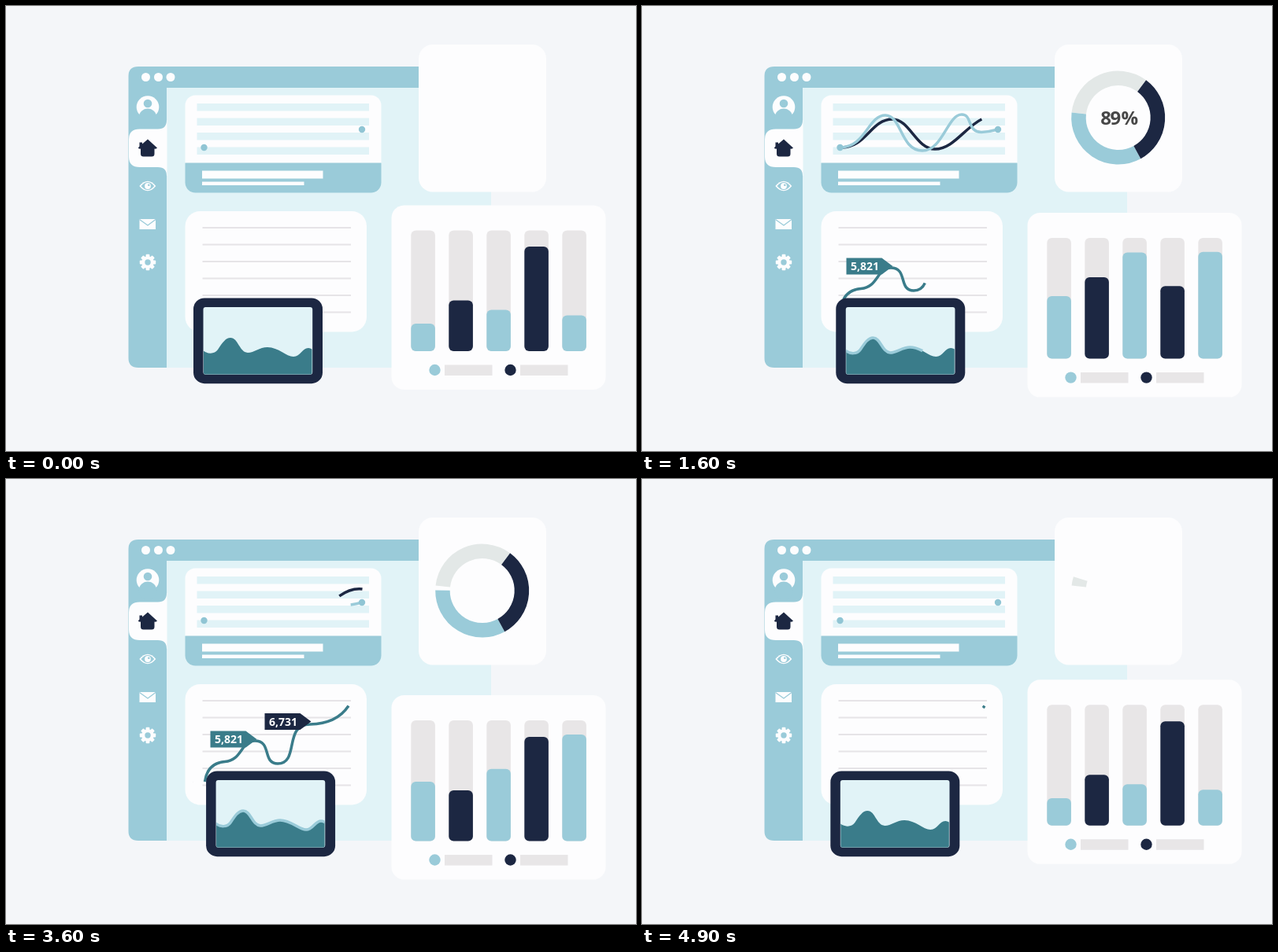
Write an HTML page that moves like this. It is 800 by 566 pixels and loops after 5000 ms.

```html
<!DOCTYPE html>
<html lang="en">
<head>
<meta charset="utf-8">
<title>Dashboard</title>
<style>
  html, body { margin: 0; width: 100%; height: 100%; overflow: hidden; background: #f4f6f9; }
  svg { display: block; width: 100%; height: 100%; }
  text { font-family: "Noto Sans", "Open Sans", sans-serif; font-weight: 700; }
  .blue { fill: #9acbd9; }
  .pale { fill: #e1f3f7; }
  .white { fill: #fdfdfe; }
  .navy { fill: #1c2742; }
  .teal { fill: #3a7c8a; }
  .grey { fill: #e8e6e7; }
  .line { fill: none; stroke-width: 3.5; }
  .tag text { font-size: 14px; fill: #fff; }
  .count { font-size: 24px; font-stretch: 87.5%; fill: #474747; }
  .count .mid { text-anchor: middle; }
</style>
</head>
<body>
<svg viewBox="0 0 800 566">
  <defs>
    <clipPath id="screen"><rect x="251" y="383" width="137.5" height="85.5" rx="2"/></clipPath>
    <clipPath id="roll"><rect x="575" y="125" width="34" height="30.5"/></clipPath>
    <clipPath id="panel"><rect x="227.5" y="113.5" width="249" height="124" rx="13"/></clipPath>
  </defs>

  <!-- window -->
  <path class="pale" d="M200 100H616V460H200Z"/>
  <path class="blue" d="M168 77H616V104H204V460H168Q155.500 460 155.500 448V89Q155.500 77 168 77Z"/>
  <g class="white">
    <circle cx="177.500" cy="90.500" r="5.500"/>
    <circle cx="193.500" cy="90.500" r="5.500"/>
    <circle cx="209" cy="90.500" r="5.500"/>
    <path d="M204.500 145V216H204Q204 205 193 205H170Q156 205 156 192V169.500Q156 156.500 170 156.500H193Q204 156.500 204 145Z"/>
    <circle cx="180" cy="128.500" r="14.300"/>
  </g>
  <g class="blue">
    <circle cx="180" cy="124" r="5.300"/>
    <ellipse cx="180" cy="142" rx="11.300" ry="11.500"/>
  </g>
  <path class="navy" d="M180 169.500L192 180.500Q191 182 188.500 181.500V188Q188.500 191.500 185 191.500H174.500Q171 191.500 171 188V181.500Q168.500 182 167.800 180.500L169.500 178.500V173.500H173V175.500Z"/>
  <g class="white">
    <path d="M169.300 229Q180 216.500 190.300 229Q180 241.500 169.300 229Z"/>
    <path d="M169.500 271H190V284H169.500Z"/>
    <g id="gear"><circle cx="180" cy="326" r="7.800"/></g>
  </g>
  <path d="M171.500 229Q180 219 188.200 229Q180 239 171.500 229Z" class="blue"/>
  <circle cx="180" cy="229" r="3.900" class="white"/>
  <circle cx="181.300" cy="227.700" r="1.300" class="blue"/>
  <path d="M169.500 271.500L180 279L190 271.500" fill="none" stroke="#9acbd9" stroke-width="1.300"/>
  <circle cx="180" cy="326" r="3.700" class="blue"/>

  <!-- two-line chart -->
  <g clip-path="url(#panel)">
    <path class="white" d="M227 113H477V200H227Z"/>
    <path class="blue" d="M227 199.500H477V238H227Z"/>
  </g>
  <path class="pale" d="M242.500 124H461V133.500H242.500ZM242.500 142.500H461V152H242.500ZM242.500 161H461V170.500H242.500ZM242.500 179.500H461V189H242.500Z"/>
  <path class="white" d="M249 209.500H402.500V219.500H249ZM249 223.500H378.500V228H249Z"/>
  <path id="navyLine" class="line" stroke="#1c2742" pathLength="1" d="M251.500 180C285 181 290 144 318 144C340 144 348 182 372 182C402 182 418 136 452.500 140"/>
  <path id="blueLine" class="line" stroke="#9acbd9" pathLength="1" d="M251.500 180C284 180 287 139 309 139C330 139 328 184 356 184C382 184 388 138 406 138C420 138 412 160 431 160.500Q441 160 452 157"/>
  <g fill="#90c5d4">
    <circle cx="251.500" cy="180" r="4.200"/>
    <circle cx="452" cy="157" r="4.200"/>
  </g>

  <!-- tagged chart -->
  <rect class="white" x="227.500" y="261" width="230.500" height="153.500" rx="19"/>
  <path d="M249.500 282H438M249.500 303.500H438M249.500 325H438M249.500 346.500H438M249.500 368H438M249.500 389.500H438" stroke="#e6e4e7" stroke-width="1.800"/>
  <path id="tealLine" class="line" stroke="#3a7c8a" pathLength="1" d="M252.500 385C255 366 266 360.500 278 359.500C300 358 298 333 316 333C338 333 325 362 345 362C373 362 352 312 386 312C408 311 424 305 435 288.500"/>
  <g id="tagA" class="tag">
    <path class="teal" d="M259.500 320.500H304.500L318.500 331L304.500 341.500H259.500Z"/>
    <text x="265" y="336">5,821</text>
  </g>
  <g id="tagB" class="tag">
    <path class="navy" d="M328.500 298H373.500L387.500 308.500L373.500 319H328.500Z"/>
    <text x="334" y="313.500">6,731</text>
  </g>

  <!-- tablet -->
  <g id="tablet">
    <rect class="navy" x="238" y="371.500" width="164" height="108.700" rx="14"/>
    <rect class="pale" x="250.500" y="383" width="138.700" height="85.700" rx="3"/>
    <g clip-path="url(#screen)">
      <path id="hill" class="teal"/>
      <path id="ridge" class="line" stroke="#9acbd9" pathLength="1"/>
    </g>
  </g>

  <!-- bar card -->
  <g id="barCard">
    <rect class="white" x="489.500" y="253.500" width="272" height="234.500" rx="16"/>
    <g id="bars"></g>
    <circle class="blue" cx="544.500" cy="463" r="7.200"/>
    <circle class="navy" cx="640.500" cy="463" r="7.200"/>
    <path class="grey" d="M557 456.500H617.500V470H557ZM653 456.500H713.500V470H653Z"/>
  </g>

  <!-- ring card -->
  <rect class="white" x="524" y="49" width="162" height="187.500" rx="18"/>
  <g fill="none" stroke-width="18.500">
    <path id="ringGrey" stroke="#e3e8e7"/>
    <path id="ringBlue" stroke="#9acbd9"/>
    <path id="ringNavy" stroke="#1c2742"/>
  </g>
  <g class="count">
    <g clip-path="url(#roll)"><g id="digits"></g></g>
    <text id="percent" x="608.500" y="151">%</text>
  </g>
</svg>
<script>
  const $ = id => document.getElementById(id);
  const LOOP = 5000, STEP = 100, ROW = 26;

  function add(parent, tag, attrs, text) {
    const el = document.createElementNS("http://www.w3.org/2000/svg", tag);
    for (const k in attrs) el.setAttribute(k, attrs[k]);
    if (text !== undefined) el.textContent = text;
    return $(parent).appendChild(el);
  }

  // Linear interpolation through time, value pairs.
  function key(t, ...k) {
    if (t <= k[0]) return k[1];
    for (let i = 2; i < k.length; i += 2) {
      if (t <= k[i]) {
        return k[i - 1] + (k[i + 1] - k[i - 1]) * (t - k[i - 2]) / (k[i] - k[i - 2]);
      }
    }
    return k[k.length - 1];
  }

  const shift = (id, x, y) => $(id).setAttribute("transform", `translate(${x} ${y})`);
  const fade = (id, v) => $(id).setAttribute("opacity", v);

  function trim(id, from, to) {
    const el = $(id);
    el.style.display = to - from > 0.001 ? "" : "none";
    el.setAttribute("stroke-dasharray", `0 ${from} ${to - from} 2`);
  }

  function arc(id, from, to) {
    const at = deg => {
      const a = deg * Math.PI / 180;
      return `${604.7 + 50.25 * Math.sin(a)} ${142 - 50.25 * Math.cos(a)}`;
    };
    const d = to - from > 0.05 ? `M${at(from)}A50.25 50.25 0 0 1 ${at(to)}` : "";
    $(id).setAttribute("d", d);
  }

  const wave = "M250 438C256 443 265 443 269 437C275 428 279 422 285 422C295 422 296 440 307 441C315 441 322 434 332 434C346 434 356 446 365 446C374 446 376 435 384 435Q387 435 390 437.500";
  $("ridge").setAttribute("d", wave);
  $("hill").setAttribute("d", wave + "V469H250Z");

  for (let i = 0; i < 8; i++) {
    add("gear", "rect", { x: 177.6, y: 315.8, width: 4.8, height: 5, rx: 1, transform: `rotate(${i * 45} 180 326)` });
  }

  const heights = [
    [0, 35, 1000, 79.5, 3520, 79.5, 4400, 34.8],
    [0, 64.5, 1000, 103.5, 2500, 103.5, 3500, 64.5],
    [0, 52.5, 1000, 135, 3080, 135, 4070, 52.5],
    [0, 133, 1000, 86, 3000, 107.5, 3600, 132.5],
    [0, 45.5, 1000, 114, 1330, 136, 3600, 135.5, 4400, 45.5]
  ];
  const bars = heights.map((_, i) => {
    const box = { x: 514.3 + i * 48, width: 30.6, rx: 6 };
    add("bars", "rect", { ...box, y: 285.5, height: 153.5, class: "grey" });
    return add("bars", "rect", { ...box, class: i % 2 ? "navy" : "blue" });
  });

  for (let i = 0; i < 9; i++) {
    const y = 151 - i * ROW;
    add("digits", "text", { x: 589, y, class: "mid" }, 8 - i);
    add("digits", "text", { x: 601.3, y, class: "mid" }, 9 - i);
  }

  function draw(t) {
    shift("tablet", key(t, 0, 0, 960, 23, 1960, 0, 2990, 23, 5000, 0.2), 0);
    shift("barCard", 0, key(t, 0, 0, 1040, 23, 2000, 0, 3470, 23.5, 5000, 0.2));

    bars.forEach((bar, i) => {
      const h = key(t, ...heights[i]);
      bar.setAttribute("y", 439 - h);
      bar.setAttribute("height", h);
    });

    trim("blueLine", key(t, 2540, 0, 3660, 1), key(t, 150, 0, 1250, 1));
    trim("navyLine", key(t, 3000, 0, 3690, 1), key(t, 600, 0, 1700, 1));
    trim("tealLine", key(t, 3600, 0, 4400, 0.87, 4900, 0.988, 5000, 1), key(t, 980, 0, 2050, 1));
    trim("ridge", key(t, 3650, 0, 4350, 1), key(t, 820, 0, 1920, 1));

    fade("tagA", key(t, 1350, 0, 1600, 1, 4250, 1, 4500, 0));
    fade("tagB", key(t, 1600, 0, 1850, 1, 4450, 1, 4700, 0));

    arc("ringBlue", key(t, 100, 276.3, 530, 151.3), key(t, 3580, 276.3, 4010, 151.3));
    arc("ringNavy", key(t, 530, 151.3, 1015, 36.5), key(t, 4010, 151.3, 4410, 36.5));
    arc("ringGrey", key(t, 950, 396.5, 1470, 276.3), key(t, 4410, 396.5, 4950, 276.3));

    const roll = key(t, 150, 1, 850, 0, 2830, 0, 3530, 1);
    shift("digits", 0, 9.2 * ROW * roll * roll);
    fade("percent", key(t, 650, 0, 900, 1, 2880, 1, 3080, 0));
  }

  const start = performance.now();
  function tick() {
    const t = (performance.now() - start) % LOOP;
    draw(Math.floor(t / STEP) * STEP);
    requestAnimationFrame(tick);
  }
  tick();
</script>
</body>
</html>
```
